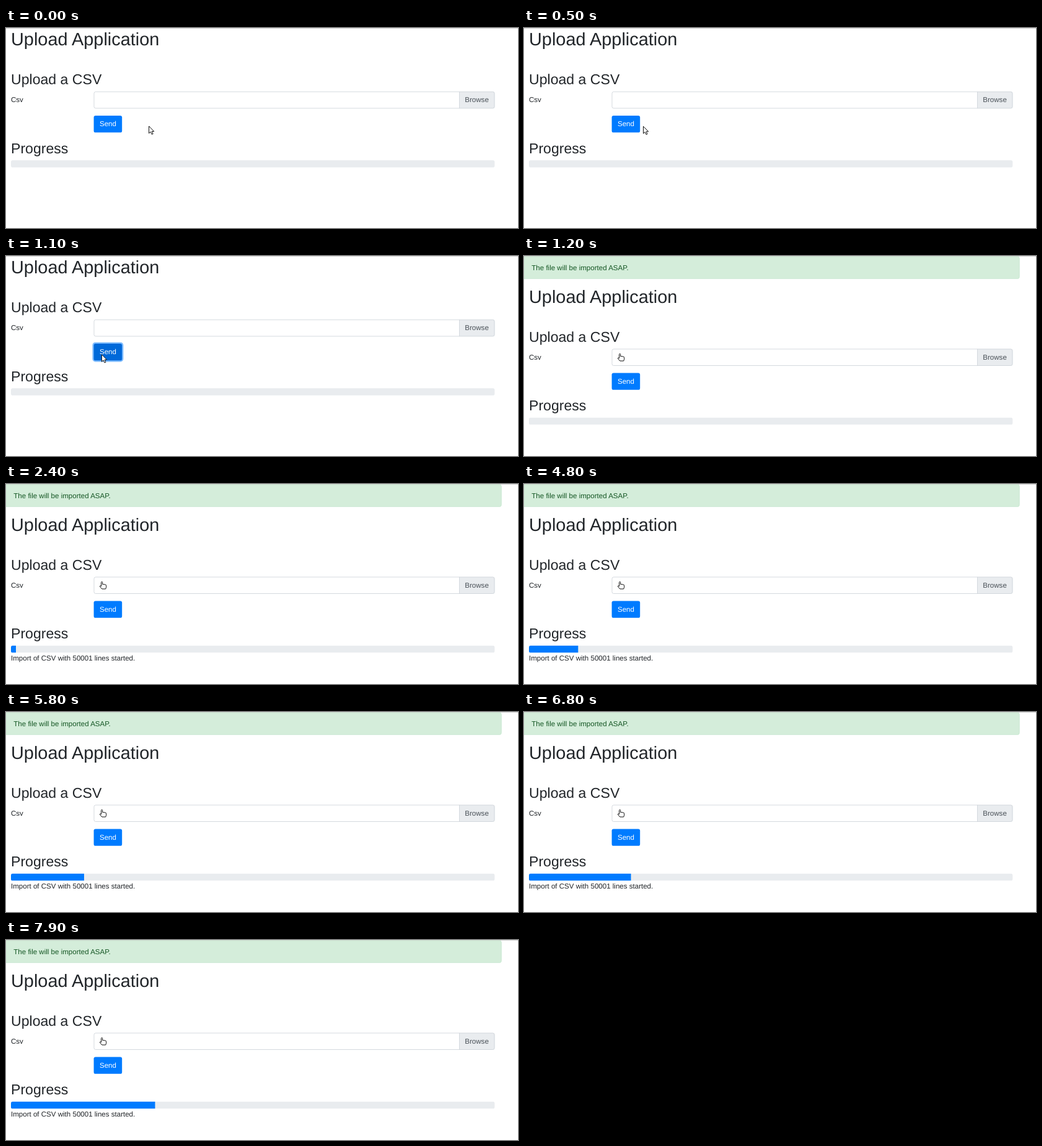
Recreate the animation shown at these times as an HTML page. Size 826 by 324 pixels, loop 8000 ms.

```html
<!DOCTYPE html>
<html lang="en">
<head>
<meta charset="utf-8">
<title>Upload Application</title>
<style>
  html, body { margin: 0; width: 100%; height: 100%; overflow: hidden; background: #fff; }
  svg { display: block; width: 826px; height: 324px; }
  text { font: 11.56px "Liberation Sans", Arial, sans-serif; fill: #212529; text-rendering: geometricPrecision; }
  .title { font-size: 28.9px; }
  .heading { font-size: 23.1px; }
  .cursor { fill: #fff; stroke: #111; stroke-width: 1; stroke-linejoin: round; }
</style>
</head>
<body>
<svg viewBox="0 0 826 324">
  <defs>
    <clipPath id="track"><rect x="8" y="214.3" width="780.3" height="11.5" rx="2.9"/></clipPath>
    <clipPath id="field"><rect x="141.6" y="102.9" width="646.8" height="27.4" rx="2.9"/></clipPath>
  </defs>
  <rect width="826" height="1" fill="#d3d3d3"/>

  <g id="alert">
    <rect x="-3" y="1" width="802.2" height="35.7" rx="2.9" fill="#d4edda" stroke="#c3e6cb" stroke-width=".75"/>
    <text x="12.3" y="22.5" style="fill:#155724">The file will be imported ASAP.</text>
  </g>

  <g id="page">
    <text class="title" x="8" y="28">Upload Application</text>
    <text class="heading" x="8" y="91.4">Upload a CSV</text>
    <text x="8" y="120.3">Csv</text>

    <g clip-path="url(#field)">
      <rect x="731.2" y="102.9" width="58" height="27.4" fill="#e9ecef"/>
      <rect x="731.2" y="102.9" width=".8" height="27.4" fill="#ced4da"/>
    </g>
    <rect x="142" y="103.3" width="646" height="26.7" rx="2.7" fill="none" stroke="#ced4da" stroke-width=".85"/>
    <text x="740.3" y="120.3" style="fill:#495057">Browse</text>

    <rect id="ring" x="139.4" y="139.7" width="50" height="31.8" rx="4.8" fill="#80bdff"/>
    <rect id="button" x="141.6" y="141.9" width="45.6" height="27.4" rx="2.9"/>
    <text x="151" y="159.3" style="fill:#fff">Send</text>

    <text class="heading" x="8" y="202.6">Progress</text>
    <g clip-path="url(#track)">
      <rect x="8" y="214" width="781" height="12" fill="#e9ecef"/>
      <rect id="bar" x="8" y="214" height="12" fill="#007bff"/>
    </g>
    <text id="status" x="8" y="238.2">Import of CSV with 50001 lines started.</text>
  </g>

  <path id="arrow" class="cursor" d="M0 0V11.6L2.7 9.2 4.6 13.3 6.5 12.5 4.7 8.5H8.2Z"/>
  <path id="hand" class="cursor" d="M153.6 165.8V159.4Q153.6 158.3 154.6 158.3T155.7 159.4V162.6Q157 161.9 157.9 162.8 159 162.2 159.9 163.1 161.7 162.9 161.7 164.6V167.2L160.7 170H154.8L151.6 166.4Q150.9 165.2 151.9 164.8Z"/>
</svg>
<script>
  const LOOP = 8000, STEP = 100;
  const SUBMITTED = 1200, STARTED = 2000, ALERT_SHIFT = 47.5;
  const $ = id => document.getElementById(id);

  // [time in ms, filled width in px]
  const progress = [
    [2000, 0], [2300, 8], [2900, 8], [3700, 35], [4600, 70], [5500, 112],
    [5800, 118], [6400, 141], [7300, 194], [7900, 232.5]
  ];

  function interpolate(points, t) {
    const next = points.findIndex(point => point[0] >= t);
    if (next < 0) return points[points.length - 1][1];
    if (next === 0) return points[0][1];
    const [t0, v0] = points[next - 1], [t1, v1] = points[next];
    return v0 + (v1 - v0) * (t - t0) / (t1 - t0);
  }

  function smooth(t, from, to) {
    const p = Math.min(1, Math.max(0, (t - from) / (to - from)));
    return p * p * (3 - 2 * p);
  }

  const show = (id, visible) => $(id).setAttribute("visibility", visible ? "visible" : "hidden");

  function render(t) {
    const submitted = t >= SUBMITTED;
    const travel = smooth(t, 100, 900);
    const x = 230.6 - 76.2 * travel, y = 159 + 0.6 * travel;
    const hovered = !submitted && x < 187;

    show("alert", submitted);
    show("hand", submitted);
    show("arrow", !submitted);
    show("ring", t >= 1000 && !submitted);
    show("status", t >= STARTED);
    $("page").setAttribute("transform", `translate(0 ${submitted ? ALERT_SHIFT : 0})`);
    $("arrow").setAttribute("transform", `translate(${x} ${y})`);
    $("button").setAttribute("fill", hovered ? "#0069d9" : "#007bff");
    $("bar").setAttribute("width", interpolate(progress, t));
  }

  const start = performance.now();
  function tick() {
    const elapsed = (performance.now() - start) % LOOP;
    render(Math.floor(elapsed / STEP) * STEP);
    requestAnimationFrame(tick);
  }
  tick();
</script>
</body>
</html>
```
